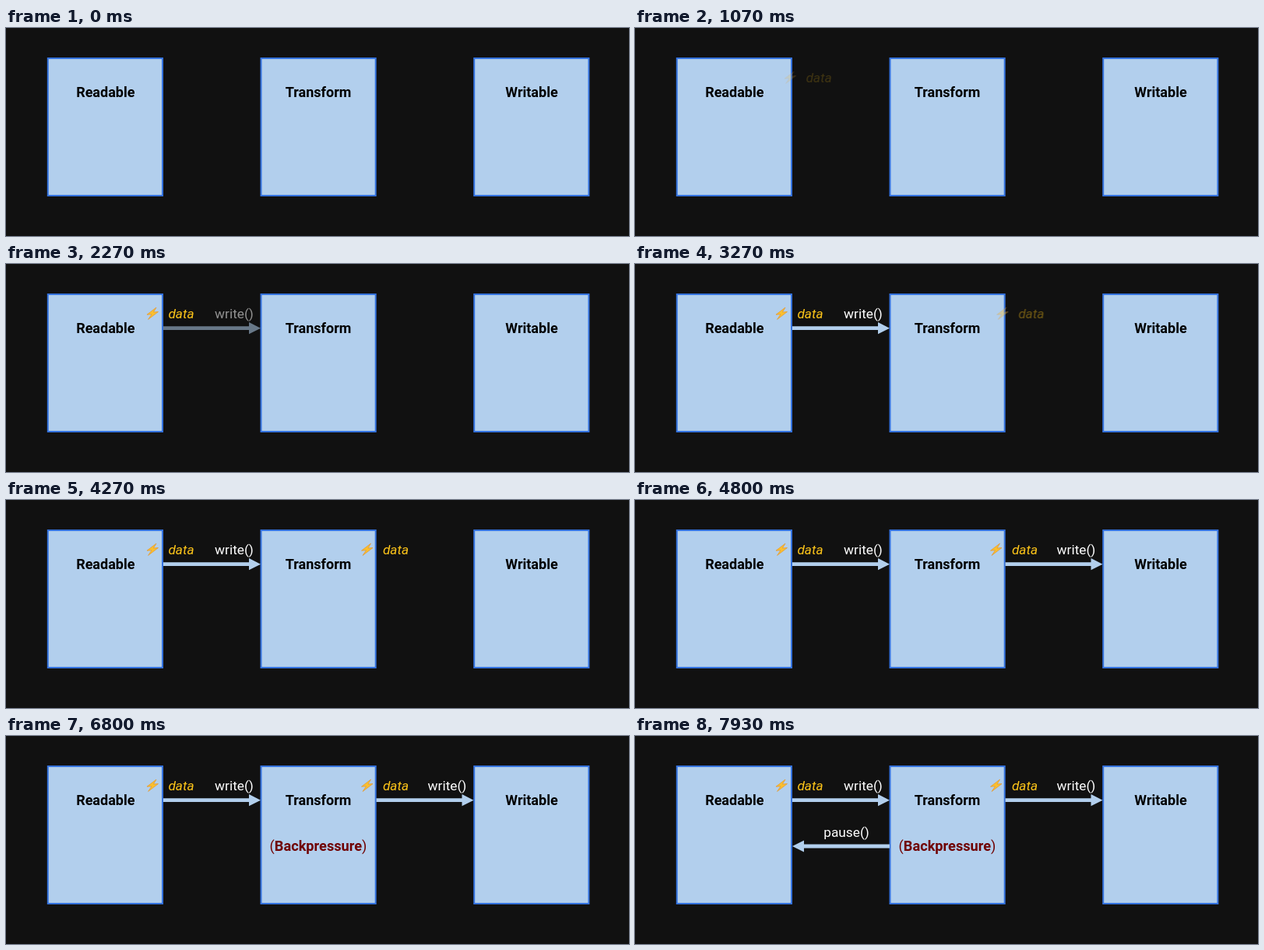
Write an HTML page that moves like this. It is 800 by 268 pixels and loops after 8 s.

```html
<!DOCTYPE html>
<html lang="en">
<head>
<meta charset="utf-8">
<title>Stream backpressure</title>
<style>
  html, body { margin: 0; width: 100%; height: 100%; overflow: hidden; background: #111; }
  svg { display: block; width: 100%; height: 100%; }
  text { font: 17.3px Roboto, "Open Sans", sans-serif; text-anchor: middle; fill: #fff; }
  .name { font-size: 18px; font-weight: 700; fill: #000; }
  .data { font-style: italic; fill: #fcc419; }
  .warn { font-size: 18.2px; fill: #700000; }
  .warn tspan { font-weight: 700; }
  .box { fill: #b2cfed; stroke: #3472de; stroke-width: 2; }
  .arrow { fill: #b2cfed; }
  .bolt { fill: #fbc02d; stroke: #e39a35; stroke-width: .8; stroke-linejoin: round; }
  .step { opacity: 0; }
</style>
</head>
<body>
<svg viewBox="0 0 800 268">
  <defs>
    <path id="arrow" class="arrow" d="M0 -2.4H110V-7.6L125 0L110 7.6V2.4H0Z"/>
    <g id="event">
      <path class="bolt" d="M193 56L181 65.2L187 64.8L182.6 71.4L195.5 61.6L189.4 62Z"/>
      <text class="data" x="225" y="70.3">data</text>
    </g>
    <g id="write">
      <use href="#arrow" x="202" y="82.7"/>
      <text x="293" y="70.3">write()</text>
    </g>
  </defs>

  <rect class="box" x="53.8" y="39" width="147.2" height="177"/>
  <rect class="box" x="327.5" y="39" width="147.2" height="177"/>
  <rect class="box" x="601.2" y="39" width="147.2" height="177"/>
  <text class="name" x="127.8" y="88.8">Readable</text>
  <text class="name" x="401" y="88.8">Transform</text>
  <text class="name" x="675" y="88.8">Writable</text>

  <g class="step" id="data1"><use href="#event"/></g>
  <g class="step" id="write1"><use href="#write"/></g>
  <g class="step" id="data2"><use href="#event" x="275.5"/></g>
  <g class="step" id="write2"><use href="#write" x="273.5"/></g>
  <g class="step" id="full">
    <text class="warn" x="401" y="148">(<tspan>Backpressure</tspan>)</text>
  </g>
  <g class="step" id="pause">
    <use href="#arrow" transform="translate(327 142) rotate(180)"/>
    <text x="271.5" y="130.3">pause()</text>
  </g>
</svg>
<script>
  const LOOP = 8000, FADE = 500;

  // id, start in ms, distance it slides in from the right
  const steps = [
    ['data1', 970, 14],
    ['write1', 2000, 0],
    ['data2', 3070, 14],
    ['write2', 4300, 0],
    ['full', 5500, 0],
    ['pause', 6870, 0],
  ];

  for (const [id, start, shift] of steps) {
    const hidden = { opacity: 0, transform: `translateX(${shift}px)` };
    const shown = { opacity: 1, transform: 'translateX(0px)' };
    document.getElementById(id).animate([
      { ...hidden, offset: 0 },
      { ...hidden, offset: start / LOOP },
      { ...shown, offset: (start + FADE) / LOOP },
      { ...shown, offset: 1 },
    ], { duration: LOOP, iterations: Infinity });
  }
</script>
</body>
</html>
```
